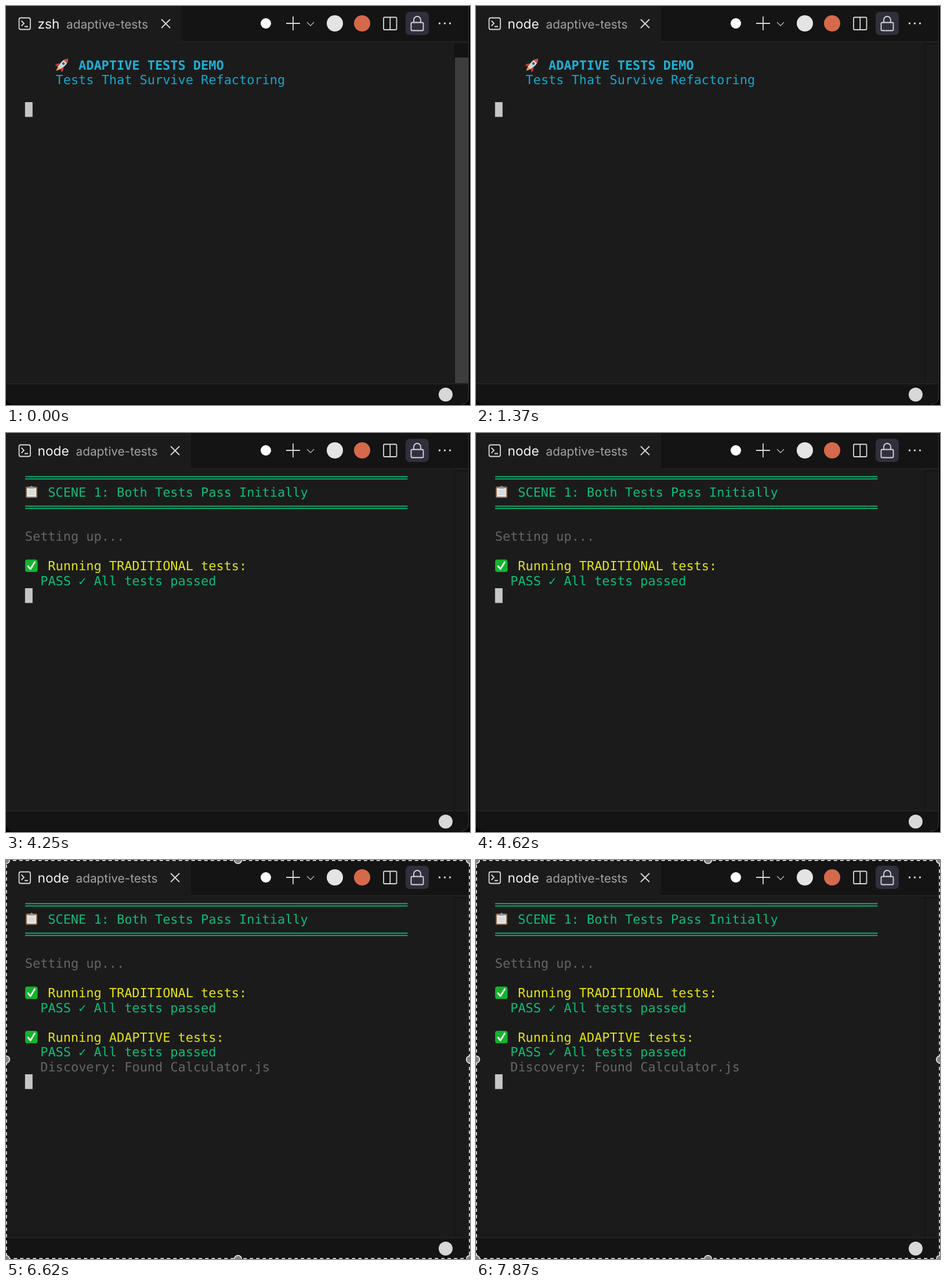
Recreate the animation shown at these times as an HTML page. Size 800 px wide and 689 px high, loop 8 s.

```html
<!DOCTYPE html>
<html lang="en">
<head>
<meta charset="utf-8">
<title>Terminal demo</title>
<style>
  html, body { margin: 0; width: 100%; height: 100%; overflow: hidden; background: #000; }
  svg { display: block; width: 800px; height: 689px; }
  text { white-space: pre; text-rendering: geometricPrecision; }
  .term { font: 21.92px "DejaVu Sans Mono", "Noto Sans Mono", monospace; }
  .ui { font-family: Inter, Roboto, sans-serif; }
  .name { font-size: 22.7px; fill: #f4f4f4; }
  .desc { font-size: 20.8px; fill: #a3a3a3; }
  .line { fill: none; stroke: #d8d8d8; stroke-width: 1.8; }
  .cyan { fill: #11a8cd; }
  .bold { fill: #1fb0d5; font-weight: bold; }
  .green { fill: #0dbc79; }
  .yellow { fill: #e5e510; }
  .grey { fill: #666; }

  .cut { animation: 8s step-end infinite; }
  #zsh { animation-name: zsh; }
  #node { animation-name: node; }
  #intro { animation-name: intro; }
  #scene { animation-name: scene; }
  #traditional { animation-name: traditional; }
  #adaptive { animation-name: adaptive; }
  #selection { animation-name: selection; }
  #cursor { animation-name: cursor; }
  #slider { animation: fade 8s linear infinite; }

  @keyframes zsh { 0% { opacity: 1 } 4.6%, to { opacity: 0 } }
  @keyframes node { 0% { opacity: 0 } 4.6%, to { opacity: 1 } }
  @keyframes intro { 0% { opacity: 1 } 25%, to { opacity: 0 } }
  @keyframes scene { 0% { opacity: 0 } 25%, to { opacity: 1 } }
  @keyframes traditional { 0% { opacity: 0 } 53.12%, to { opacity: 1 } }
  @keyframes adaptive { 0% { opacity: 0 } 78.12%, to { opacity: 1 } }
  @keyframes selection { 0% { opacity: 0 } 82.75%, to { opacity: 1 } }
  @keyframes fade { 0%, 4% { opacity: 1 } 14%, to { opacity: 0 } }
  /* the cursor hops by whole rows of 25.5px */
  @keyframes cursor {
    0% { transform: translateY(102px); opacity: 1 }
    25% { transform: translateY(127.5px); opacity: 0 }
    28.12% { transform: translateY(127.5px); opacity: 1 }
    53.12% { transform: translateY(204px); opacity: 1 }
    78.12%, to { transform: translateY(306px); opacity: 1 }
  }
</style>
</head>
<body>
<svg viewBox="0 0 800 689" xmlns="http://www.w3.org/2000/svg">
  <defs>
    <clipPath id="window"><rect x="0" y="-20" width="798" height="708" rx="13"/></clipPath>
    <g id="tick">
      <rect width="21.5" height="21.5" rx="4" fill="#13b32d"/>
      <path d="M5 11.5l4.2 5L16.5 4.5" fill="none" stroke="#fff" stroke-width="2.8" stroke-linecap="round" stroke-linejoin="round"/>
    </g>
    <path id="close" class="line" d="M-7.5-7.5l15 15m0-15l-15 15"/>
  </defs>

  <rect width="800" height="689" fill="#000"/>
  <g clip-path="url(#window)">
    <rect width="800" height="689" fill="#1b1b1b"/>
    <rect y="652" width="800" height="37" fill="#141414"/>
    <path d="M0 652.5h798" stroke="#2b2b2b"/>

    <!-- tab bar -->
    <g id="zsh" class="cut ui">
      <path d="M303 0h497v61h-497z" fill="#141414"/>
      <path d="M303 61.5h495" stroke="#2a2a2a"/>
      <text class="name" x="54.5" y="39">zsh</text>
      <text class="desc" x="104" y="39">adaptive-tests</text>
      <use href="#close" x="275.5" y="30.5"/>
    </g>
    <g id="node" class="cut ui">
      <path d="M319 0h481v61h-481z" fill="#141414"/>
      <path d="M319 61.5h479" stroke="#2a2a2a"/>
      <text class="name" x="54.5" y="39">node</text>
      <text class="desc" x="120.5" y="39">adaptive-tests</text>
      <use href="#close" x="291.5" y="30.5"/>
    </g>
    <g class="line">
      <rect x="22.5" y="20.5" width="19.5" height="20" rx="3"/>
      <path d="M26.5 25.5l4.5 4.5-4.5 4.5M32 35.5h6"/>
      <path d="M483 30h24M495 18v24"/>
      <path d="M519 28l6 6 6-6" stroke="#aaa" stroke-width="1.5"/>
      <rect x="651" y="19.5" width="22.5" height="21.5" rx="2"/>
      <path d="M662.3 19.5v21.5"/>
    </g>
    <circle cx="448" cy="30" r="9" fill="#fff"/>
    <circle cx="567" cy="30" r="14" fill="#e4e4e4"/>
    <circle cx="614" cy="30" r="14" fill="#d5694b"/>
    <rect x="689" y="10" width="40" height="40" rx="7" fill="#302f3c"/>
    <path class="line" d="M700.5 28.5h17q2 0 2 2v10q0 2-2 2h-17q-2 0-2-2v-10q0-2 2-2zM703 28.5v-4.5a6 6 0 0 1 12 0v4.5"/>
    <g fill="#d8d8d8">
      <circle cx="747.5" cy="30" r="1.7"/>
      <circle cx="756.5" cy="30" r="1.7"/>
      <circle cx="765.5" cy="30" r="1.7"/>
      <circle cx="758" cy="671" r="12"/>
    </g>

    <!-- scrollbar -->
    <path d="M798 65.5h-24.5V651" fill="none" stroke="#101010"/>
    <g id="slider">
      <rect x="774" y="65" width="24" height="24" fill="#131313"/>
      <rect x="774" y="89" width="24" height="562" fill="#3d3d3d"/>
    </g>

    <!-- terminal -->
    <g class="term">
      <g id="intro" class="cut">
        <g transform="translate(97 101.5) rotate(45)">
          <path d="M-3 8h6l-3 7z" fill="#f5a623"/>
          <path d="M-4 0l-4 6v4l5-3zM4 0l4 6v4l-5-3z" fill="#c93a32"/>
          <path d="M0-14q5 5 4.5 12L3 8h-6L-4.5-2Q-5-9 0-14z" fill="#cfd5da"/>
          <path d="M0-14q3 3 4 6.5h-8Q-3-11 0-14z" fill="#d6453b"/>
          <circle cy="-3" r="2.3" fill="#34607f"/>
        </g>
        <text class="bold" x="125" y="109.5">ADAPTIVE TESTS DEMO</text>
        <text class="cyan" x="85.5" y="135">Tests That Survive Refactoring</text>
      </g>

      <g id="scene" class="cut">
        <path d="M33 75.3h659.5m-659.5 4h659.5M33 126.3h659.5m-659.5 4h659.5" stroke="#0dbc79" stroke-width="1.8"/>
        <rect x="34" y="92.5" width="20" height="19.5" rx="2" fill="#8f6b50"/>
        <rect x="36" y="95" width="16" height="15" fill="#e4e6e8"/>
        <path d="M39 96v-3h3q2-4 4 0h3v3z" fill="#8e959b"/>
        <path d="M38.5 100h11m-11 3h11m-11 3h11" stroke="#c2c6ca"/>
        <text class="green" x="72.3" y="109.5">SCENE 1: Both Tests Pass Initially</text>
        <text class="grey" x="32.8" y="186">Setting up...</text>
      </g>

      <g id="traditional" class="cut">
        <use href="#tick" x="33" y="218.5"/>
        <text class="yellow" x="72.3" y="237">Running TRADITIONAL tests:</text>
        <text class="green" y="262.5"><tspan x="59.2">PASS</tspan><tspan x="125">✓</tspan><tspan x="151.4">All tests passed</tspan></text>
      </g>

      <g id="adaptive" class="cut">
        <use href="#tick" x="33" y="295"/>
        <text class="yellow" x="72.3" y="313.5">Running ADAPTIVE tests:</text>
        <text class="green" y="339"><tspan x="59.2">PASS</tspan><tspan x="125">✓</tspan><tspan x="151.4">All tests passed</tspan></text>
        <text class="grey" x="59.2" y="364.5">Discovery: Found Calculator.js</text>
      </g>

      <rect id="cursor" class="cut" x="32.8" y="64" width="13" height="25.5" fill="#c6c6c6"/>
    </g>
  </g>
  <path d="M797.5 0V675q0 12.5-13 12.5" fill="none" stroke="#3c3c3c"/>

  <!-- capture frame -->
  <g id="selection" class="cut">
    <rect x=".75" y=".75" width="798.5" height="687.5" fill="none" stroke="#000" stroke-width="1.5"/>
    <rect x=".75" y=".75" width="798.5" height="687.5" fill="none" stroke="#fff" stroke-width="1.5" stroke-dasharray="6 5"/>
    <g fill="#858585" stroke="#eee" stroke-width="1.6">
      <circle cx="400" r="6.3"/>
      <circle cx="400" cy="689" r="6.3"/>
      <circle cy="344.5" r="6.3"/>
      <circle cx="800" cy="344.5" r="6.3"/>
      <circle r="6.3"/>
      <circle cx="800" r="6.3"/>
      <circle cy="689" r="6.3"/>
      <circle cx="800" cy="689" r="6.3"/>
    </g>
  </g>
</svg>
</body>
</html>
```
